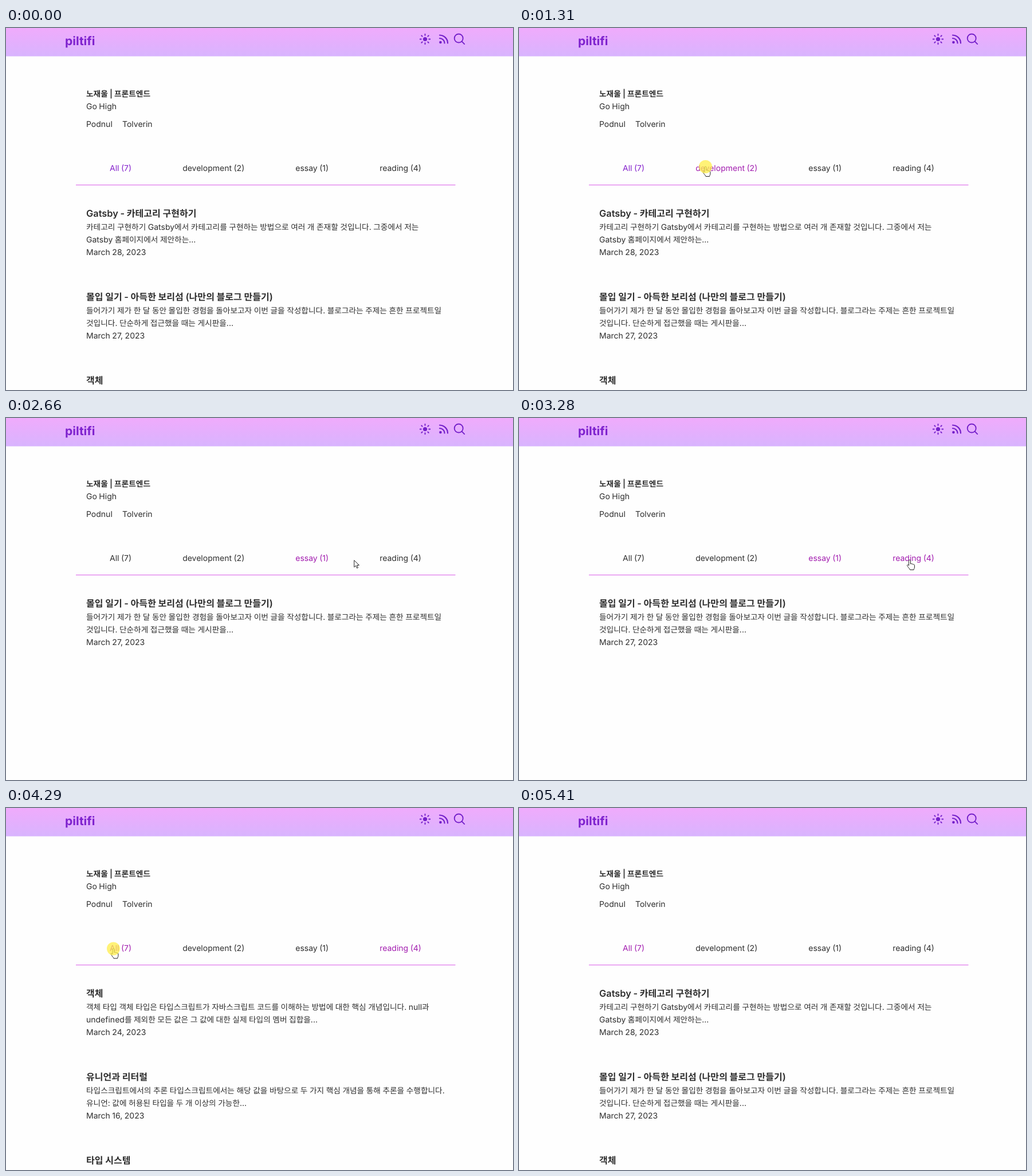
Animation, 885 px wide and 633 px high, one loop 5.87 s. Source, as an HTML page:

```html
<!DOCTYPE html>
<html lang="ko">
<head>
<meta charset="utf-8">
<style>
html, body { margin: 0; width: 100%; height: 100%; overflow: hidden; background: #fefefe; }
svg { display: block; }
text { font: 14px Inter, "Noto Sans CJK KR", sans-serif; fill: #2e2e2e; word-spacing: -.03em; text-rendering: geometricPrecision; }
.ko { font-family: "Noto Sans CJK KR", "Noto Sans CJK", sans-serif; font-size: .979em; }
.bold { font-weight: 600; }
.title { font-weight: 600; font-size: 16.4px; }
.logo { font-weight: 700; font-size: 21px; fill: #7e22ce; }
.icon { fill: none; stroke: #7420ca; stroke-width: 1.9; stroke-linecap: round; }
.dot { fill: #7420ca; }
.cursor { fill: #fff; stroke: #222; stroke-linejoin: round; }
</style>
</head>
<body>
<svg width="885" height="633" viewBox="0 0 885 633">
  <defs>
    <linearGradient id="bar" x2="0" y2="1">
      <stop stop-color="#f0abfc"/><stop offset="1" stop-color="#d8b4fe"/>
    </linearGradient>
    <path id="ray" d="M0-8.8v2"/>
  </defs>
  <rect width="885" height="49.5" fill="url(#bar)"/>
  <g class="icon">
    <g id="rays" transform="translate(731.5 19.5)"></g>
    <path stroke-width="2.2" d="M757 12.5a14 14 0 0 1 14 14M757 18a8.5 8.5 0 0 1 8.5 8.5"/>
    <circle cx="790.2" cy="18" r="7.5"/>
    <path d="M795.6 23.4l4.6 4.7"/>
  </g>
  <circle class="dot" cx="731.5" cy="19.5" r="3.6"/>
  <circle class="dot" cx="758.4" cy="25" r="2.3"/>
  <g id="page"></g>
  <path d="M122 274.5h662.5" stroke="#d95fe8"/>
  <g id="tabs"></g>
  <g id="posts"></g>
  <g id="pointer">
    <path id="cursor" class="cursor"/>
    <circle id="click" r="11.5" fill="#ffee4a" opacity=".75"/>
  </g>
</svg>
<script>
const LOOP = 5870, LEFT = 140, TAB_GAP = 89, POST_STEP = 146.4, LINE = 22;
const PRESS = 135, LOAD = 200; // click highlight, delay until the list changes
const DARK = '#2e2e2e', ACTIVE = '#a21caf', FIRST = '#8420cc';
const ARROW = 'M0 0v12l2.8-2.6 2 4.4 2-.9-2-4.3h3.9z';
const HAND = 'M-1.5 1.2c0-2 3-2 3 0v5.5c.5-.9 2.4-.8 2.6.4.6-.6 2.2-.4 2.4.7.8-.4 1.9 0 1.9 1.3v3.4' +
  'c0 2-1.3 2.6-1.3 4.5h-6.6c-.6-2-2.5-3.4-3.6-5.4-.8-1.2-1.9-2.3-1.2-3.1.8-.8 2 .1 2.8 1z';

const $ = id => document.getElementById(id);
const text = (x, y, str, cls = '') => `<text x="${x}" y="${y}" class="${cls}">` +
  str.replace(/[가-힣]+/g, '<tspan class="ko">$&</tspan>') + '</text>';

for (let a = 0; a < 360; a += 45) $('rays').innerHTML += `<use href="#ray" transform="rotate(${a})"/>`;

$('page').innerHTML =
  text(103, 30, 'piltifi', 'logo') +
  text(LEFT, 120, '노재울 | 프론트엔드', 'bold') +
  text(LEFT, 142, 'Go High') +
  text(LEFT, 173.2, 'Podnul') +
  text(203, 173.2, 'Tolverin');

// Tabs sit in one centred row with equal gaps.
$('tabs').innerHTML = ['All (7)', 'development (2)', 'essay (1)', 'reading (4)'].map(s => text(0, 250, s)).join('');
const labels = [...$('tabs').children];
const widths = labels.map(el => el.getComputedTextLength());
let x = 453 - (widths.reduce((a, b) => a + b) + TAB_GAP * (labels.length - 1)) / 2;
const tabs = labels.map((el, i) => {
  const left = x, right = x + widths[i];
  el.setAttribute('x', left);
  x = right + TAB_GAP;
  return { left, right };
});

// title, then the lines below it
const posts = {
  category: ['Gatsby - 카테고리 구현하기',
    '카테고리 구현하기 Gatsby에서 카테고리를 구현하는 방법으로 여러 개 존재할 것입니다. 그중에서 저는',
    'Gatsby 홈페이지에서 제안하는...', 'March 28, 2023'],
  diary: ['몰입 일기 - 아득한 보리섬 (나만의 블로그 만들기)',
    '들어가기 제가 한 달 동안 몰입한 경험을 돌아보고자 이번 글을 작성합니다. 블로그라는 주제는 흔한 프로젝트일',
    '것입니다. 단순하게 접근했을 때는 게시판을...', 'March 27, 2023'],
  object: ['객체',
    '객체 타입 객체 타입은 타입스크립트가 자바스크립트 코드를 이해하는 방법에 대한 핵심 개념입니다. null과',
    'undefined를 제외한 모든 값은 그 값에 대한 실제 타입의 멤버 집합을...', 'March 24, 2023'],
  union: ['유니언과 리터럴',
    '타입스크립트에서의 추론 타입스크립트에서는 해당 값을 바탕으로 두 가지 핵심 개념을 통해 추론을 수행합니다.',
    '유니언: 값에 허용된 타입을 두 개 이상의 가능한...', 'March 16, 2023'],
  types: ['타입 시스템'],
  seo: ['간단하게 SEO 개선하기',
    'SEO란? SEO 는 검색엔진에 의해 웹페이지의 트래픽 양과 질을 향상시키는 과정입니다...', 'March 13, 2023']
};
const lists = [['category', 'diary', 'object'], ['category', 'seo'], ['diary'], ['object', 'union', 'types']];
const render = list => list.map((name, i) => posts[name].map((line, j) =>
  text(LEFT, (j ? 330.8 : 329.5) + LINE * j + POST_STEP * i, line, j ? '' : 'title')).join('')).join('');

// Each move eases from the previous stop to the next one.
const ENTER = { end: 350, x: 575, y: 606 };
const moves = [
  { start: 350, end: 610, x: 344, y: 281 },
  { start: 830, end: 1170, x: 325.5, y: 242.5 },
  { start: 2000, end: 2190, x: 567, y: 250 },
  { start: 2190, end: 2260, x: 560, y: 249 },
  { start: 2600, end: 3000, x: 682, y: 248.5 },
  { start: 3415, end: 3810, x: 204, y: 262 },
  { start: 3850, end: 4150, x: 187.5, y: 246 },
  { start: 4635, end: 4980, x: 679, y: 585 },
  { start: 5140, end: 5410, x: 840, y: 634 }
];
const clicks = [{ at: 1300, tab: 1 }, { at: 2260, tab: 2 }, { at: 3140, tab: 3 }, { at: 4220, tab: 0 }];

function pointer(t) {
  if (t < ENTER.end || t >= moves.at(-1).end) return null;
  const i = moves.findLastIndex(m => t >= m.start);
  const to = moves[i], from = moves[i - 1] || ENTER;
  const p = Math.min(1, (t - to.start) / (to.end - to.start)), ease = 1 - (1 - p) ** 3;
  return { x: from.x + (to.x - from.x) * ease, y: from.y + (to.y - from.y) * ease };
}

let shown = -1;
function frame(now) {
  const t = now % LOOP, tip = pointer(t);
  const last = clicks.findLast(c => t >= c.at + LOAD);
  const active = last ? last.tab : 0;
  const hover = tip && tip.y < 257 ? tabs.findIndex(b => tip.x >= b.left && tip.x <= b.right) : -1;

  if (active !== shown) $('posts').innerHTML = render(lists[shown = active]);
  labels.forEach((el, i) => {
    el.style.fill = i === active && !last ? FIRST : i === active || i === hover ? ACTIVE : DARK;
  });

  $('pointer').style.display = tip ? '' : 'none';
  $('click').style.display = clicks.some(c => t >= c.at && t < c.at + PRESS) ? '' : 'none';
  if (tip) {
    $('cursor').setAttribute('d', hover < 0 ? ARROW : HAND);
    $('pointer').setAttribute('transform', `translate(${tip.x} ${tip.y})`);
  }
  requestAnimationFrame(frame);
}
requestAnimationFrame(frame);
</script>
</body>
</html>
```
